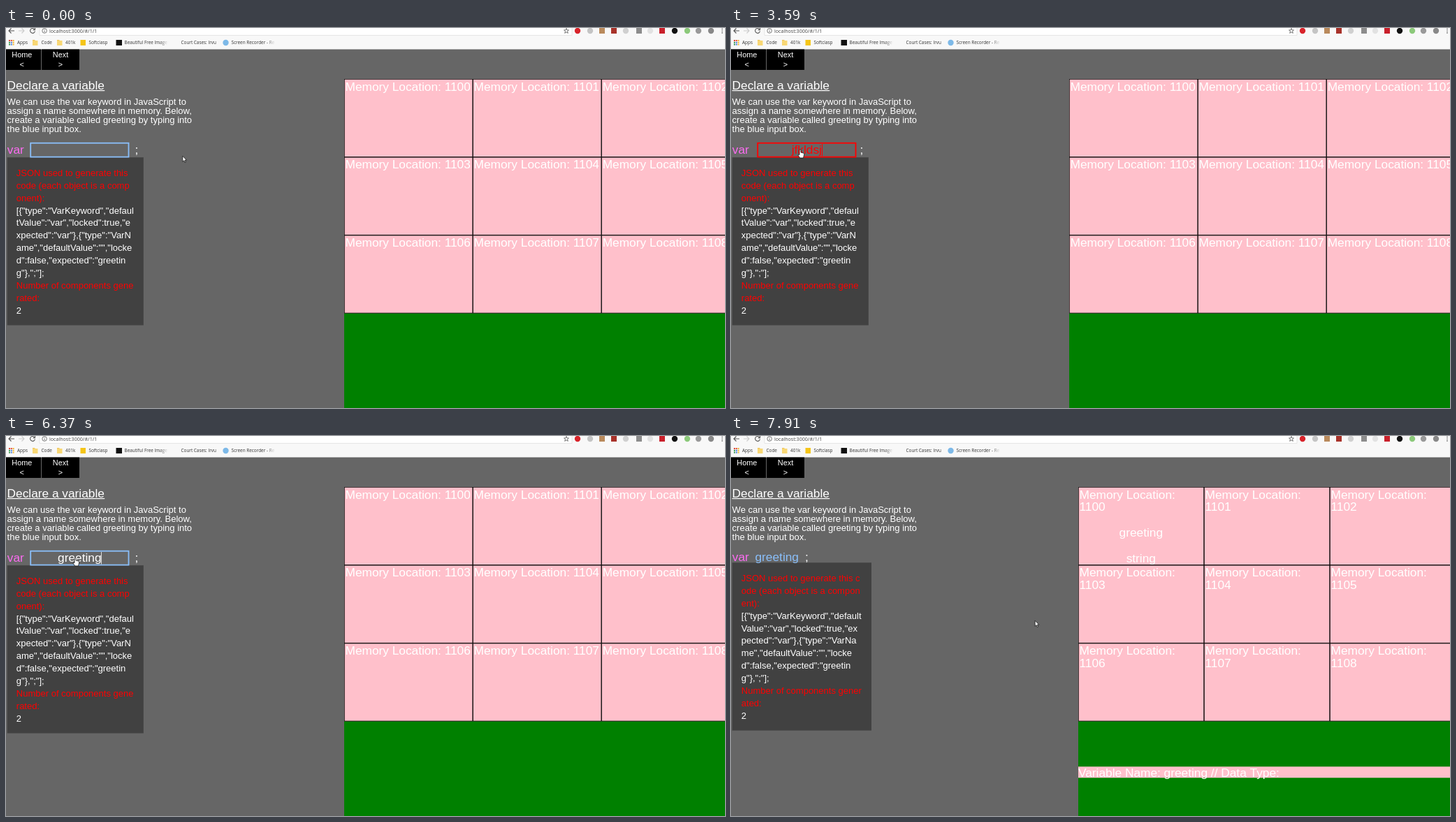
Write an HTML page with a canvas that moves like this. It is 1029 px wide and 544 px high and loops after 8000 ms.

```html
<!DOCTYPE html>
<html lang="en">
<head>
<meta charset="utf-8">
<title>Declare a variable</title>
<style>
  html, body { margin: 0; width: 100%; height: 100%; overflow: hidden; background: #666; }
  canvas { display: block; }
</style>
</head>
<body>
<canvas id="stage" width="1029" height="544"></canvas>
<script>
const ctx = document.getElementById('stage').getContext('2d');
const LOOP = 8000, SOLVED = 6850, BIG = 17.3, SMALL = 13;
const ARIAL = '"Liberation Sans", Arial, sans-serif';
const UI = '"Open Sans", "Noto Sans", sans-serif';
const BLUE = '#8abffa', PINK = '#ffc0cb', BAR = '#f8f8f8';

const PANEL_BEFORE = ['JSON used to generate this', 'code (each object is a comp', 'onent):',
  '[{"type":"VarKeyword","defaul', 'tValue":"var","locked":true,"e', 'xpected":"var"},{"type":"VarN',
  'ame","defaultValue":"","locke', 'd":false,"expected":"greetin', 'g"},";"];',
  'Number of components gene', 'rated:', '2'];
const PANEL_AFTER = ['JSON used to generate this c', 'ode (each object is a compon', 'ent):',
  '[{"type":"VarKeyword","default', 'Value":"var","locked":true,"ex', 'pected":"var"},{"type":"VarNa',
  'me","defaultValue":"","locke', 'd":false,"expected":"greetin', 'g"},";"];',
  'Number of components gener', 'ated:', '2'];

// [time, value]
const TYPED = [[0, ''], [2140, 'jf'], [2210, 'jfk'], [2280, 'jfkl'], [2350, 'jfkld'], [2420, 'jfkldsj'],
  [5220, ''], [5480, 'g'], [5660, 'gr'], [5780, 'gre'], [5890, 'gree'], [6070, 'greet'],
  [6210, 'greeti'], [6290, 'greetin'], [6370, 'greeting']];
const CARET = [[0, false], [650, true], [1170, false], [1690, true], [2950, false],
  [3450, true], [3980, false], [5220, true]];
// [time, x, y] of the pointer tip
const POINTER = [[0, 252.5, 183], [59, 252.5, 183], [60, 247, 180.5], [210, 247, 180.5], [300, 200, 178],
  [420, 140, 171], [520, 100, 167], [600, 91, 169], [740, 99, 173.5], [7849, 99, 173.5],
  [7850, 250, 215], [7909, 250, 215], [7910, 434.8, 264]];

const latest = (steps, t) => steps.filter(s => s[0] <= t).pop()[1];

function pointerAt(t) {
  const i = POINTER.findIndex(p => p[0] > t);
  if (i < 0) return POINTER[POINTER.length - 1].slice(1);
  const [a, b] = [POINTER[i - 1], POINTER[i]];
  const k = (t - a[0]) / (b[0] - a[0]);
  return [a[1] + (b[1] - a[1]) * k, a[2] + (b[2] - a[2]) * k];
}

// CSS "ease": cubic-bezier(.25, .1, .25, 1)
function ease(x) {
  if (x <= 0 || x >= 1) return x <= 0 ? 0 : 1;
  let lo = 0, hi = 1;
  for (let i = 0; i < 20; i++) {
    const s = (lo + hi) / 2;
    if (.75 * s * (1 - s) + s ** 3 < x) lo = s; else hi = s;
  }
  return .3 * lo * (1 - lo) ** 2 + 3 * lo * lo * (1 - lo) + lo ** 3;
}

function rect(x, y, w, h, color) {
  ctx.fillStyle = color;
  ctx.fillRect(x, y, w, h);
}

function text(str, x, y, size, color = '#fff', align = 'left', family = ARIAL) {
  ctx.font = `${size}px ${family}`;
  ctx.textAlign = align;
  ctx.fillStyle = color;
  ctx.fillText(str, x, y);
}

function widthOf(str, size) {
  ctx.font = `${size}px ${ARIAL}`;
  return ctx.measureText(str).width;
}

function disc(x, y, r, color) {
  ctx.fillStyle = color;
  ctx.beginPath();
  ctx.arc(x, y, r, 0, 7);
  ctx.fill();
}

function stroke(path, color, width = 1) {
  ctx.strokeStyle = color;
  ctx.lineWidth = width;
  ctx.stroke(new Path2D(path));
}

function shape(path, x, y) {
  ctx.save();
  ctx.translate(x, y);
  const p = new Path2D(path);
  ctx.fillStyle = '#fff';
  ctx.fill(p);
  ctx.strokeStyle = '#111';
  ctx.lineWidth = .8;
  ctx.stroke(p);
  ctx.restore();
}

function bookmark(label, x, fadeEnd) {
  text(label, x, 23.4, 6.4, '#333', 'left', UI);
  if (!fadeEnd) return;
  const fade = ctx.createLinearGradient(fadeEnd - 12, 0, fadeEnd, 0);
  fade.addColorStop(0, 'rgba(248,248,248,0)');
  fade.addColorStop(1, BAR);
  rect(fadeEnd - 12, 15, 40, 12, fade);
}

function browserBar() {
  rect(0, 0, 1029, 30.5, BAR);
  rect(48, 0, 762, 10.5, '#fff');
  stroke('M48 0V10.5H810V0', '#ddd', .7);
  stroke('M12 4H4M7.5 .5L4 4L7.5 7.5', '#555', 1.1);
  stroke('M18 4H26M22.5 .5L26 4L22.5 7.5', '#ccc', 1.1);
  stroke('M40.5 1.6A3.4 3.4 0 1 0 41.4 4.5M41.5 0V2.6H38.8', '#555', 1.1);
  stroke('M58.4 4A3.3 3.3 0 1 1 51.8 4A3.3 3.3 0 1 1 58.4 4M55.1 3.5V6M55.1 1.8V2.6', '#555', .8);
  text('localhost:3000/#/1/1', 62, 6.5, 7.1, '#444', 'left', UI);
  stroke('M802 .5L803 3H805.5L803.5 4.7L804.3 7.4L802 5.8L799.7 7.4L800.5 4.7L798.5 3H801Z', '#555', .8);

  [[818, '#d8232a'], [836, '#c4c4c4'], [887, '#d0d0d0'], [922, '#e2e2e2'], [957, '#111'],
    [975, '#8cc97a'], [991, '#999'], [1009, '#888']].forEach(([x, c]) => disc(x, 4, 4.2, c));
  [[853, '#b98a5c'], [870, '#a8322a'], [906, '#8c8c8c'], [939, '#c9202b']]
    .forEach(([x, c]) => rect(x - 4, 0, 8, 8, c));
  for (const y of [1.5, 4.2, 6.9]) disc(1025, y, .8, '#555');

  const dots = ['#e24a3b', '#e24a3b', '#f2b632', '#3f9b57', '#4c7fe0', '#f2b632', '#3f9b57', '#4c7fe0', '#f2b632'];
  dots.forEach((c, i) => rect(4 + i % 3 * 2.8, 17 + Math.floor(i / 3) * 2.8, 2, 2, c));
  for (const x of [38, 73]) {
    rect(x, 17, 3.5, 2, '#eec35a');
    rect(x, 18, 7.5, 7, '#f8d775');
  }
  rect(106.5, 17, 7.5, 8, '#f5c518');
  rect(157.5, 17, 8.5, 8, '#111');
  disc(242.5, 21, 4, '#2a92c4');
  disc(314.5, 21, 4.2, '#7db9e8');
  bookmark('Apps', 16, 0);
  bookmark('Code', 50.5, 0);
  bookmark('401k', 85, 0);
  bookmark('Softclasp', 118.5, 0);
  bookmark('Beautiful Free Images', 169.5, 232);
  bookmark('Court Cases: Irvu', 250.5, 0);
  bookmark('Screen Recorder - Rec', 322.5, 385);
}

function lesson() {
  [['Home', '<', 0, 50, 22.8], ['Next', '>', 51, 54, 78]].forEach(([label, sign, x, w, mid]) => {
    rect(x, 30.5, w, 29.5, '#000');
    text(label, mid, 41.8, 10.9, '#fff', 'center');
    text(sign, mid, 56, 10.9, '#fff', 'center');
  });
  text('Declare a variable', 1.6, 87.8, BIG);
  rect(1.6, 89, 139.6, 1.2, '#fff');
  ['We can use the var keyword in JavaScript to', 'assign a name somewhere in memory. Below,',
    'create a variable called greeting by typing into', 'the blue input box.']
    .forEach((line, i) => text(line, 1.6, 109.6 + i * 13, SMALL));
}

function panel(lines, width, top) {
  rect(1.6, top, width, 240.3, '#414141');
  lines.forEach((line, i) => {
    const red = i < 3 || i === 9 || i === 10;
    text(line, 14.8, top + 26.8 + i * 17.87, SMALL, red ? '#f00' : '#fff');
  });
}

function memory(left, cellWidth, wrap) {
  const cellHeight = 111.8;
  rect(left, 408.5, 1029 - left, 136, '#008000');
  for (let i = 0; i < 9; i++) {
    const x = left + i % 3 * cellWidth, y = 73 + Math.floor(i / 3) * cellHeight;
    rect(x, y, cellWidth, cellHeight, '#000');
    rect(x + .7, y + .7, cellWidth - 1.4, cellHeight - 1.4, PINK);
    const label = 'Memory Location:', id = 1100 + i;
    text(wrap ? label : `${label} ${id}`, x + 1.5, y + 16.6, BIG);
    if (wrap) text(id, x + 1.5, y + 33.9, BIG);
  }
}

function inputBox(t) {
  const wrong = t >= 2980 && t < 4530;
  const s = (t - 2980) / 1000;
  const shift = wrong ? 14.3 * Math.exp(-2.5 * s) * Math.sin(12.4 * s) : 0;
  const value = latest(TYPED, t);
  const width = widthOf(value, BIG), middle = 105.3 + shift, left = middle - width / 2;

  ctx.strokeStyle = wrong ? '#f00' : BLUE;
  ctx.lineWidth = 1.8;
  ctx.strokeRect(35.2 + shift, 164.7, 140.3, 19.9);

  // Letters are selected one by one from the end.
  if (t >= 4670 && t < 5220) {
    const count = Math.min(7, Math.floor((t - 4670) / 46.6) + 1);
    const start = left + widthOf(value.slice(0, 7 - count), BIG);
    rect(start, 167.5, left + width - start, 16, '#1272dc');
  }
  text(value, left, 180, BIG, wrong ? '#f00' : '#fff');
  if (latest(CARET, t)) rect(Math.round(left + width - .3), 166, 1, 17.5, wrong ? '#f00' : '#ddd');
}

function variableBar(t) {
  const opacity = ease((t - 7030) / 750);
  ctx.globalAlpha = opacity;
  text('greeting', 586.8, 143.6, BIG, '#fff', 'center');
  text('string', 586.8, 180.6, BIG, '#fff', 'center');
  ctx.globalAlpha = 1;
  if (t < 7030) return;

  // Critically damped slide from the left.
  const k = 13 * (t - SOLVED) / 1000;
  const x = 497 - 450 * Math.exp(-k) * (1 + k);
  ctx.save();
  ctx.beginPath();
  ctx.rect(497, 409, 532, 135);
  ctx.clip();
  rect(x, 473.3, 540, 16, PINK);
  text('Variable Name: greeting // Data Type:', x, 488, BIG);
  ctx.restore();
}

function pointer(t) {
  const [x, y] = pointerAt(t);
  const arrow = 'M.3 .3V8.4L2.2 6.7L3.5 9.6L4.8 9L3.5 6.2H6Z';
  const hand = 'M-1 1Q0-.4 1 1V4.6L5 5.6Q6 6 5.7 7.6L4.6 12.5H-.4L-3 8.6Q-3 7-1 8Z';
  shape(x < 177 ? hand : arrow, x, y);
}

function draw(t) {
  const solved = t >= SOLVED;
  rect(0, 0, 1029, 544, '#666');
  browserBar();
  lesson();
  const baseline = solved ? 178.5 : 180;
  text('var', 1.8, baseline, BIG, '#fb6cf0');
  text(';', solved ? 106 : 184.6, baseline, BIG);
  if (solved) {
    panel(PANEL_AFTER, 199.4, 181.3);
    text('greeting', 34.5, baseline, BIG, BLUE);
    memory(497, 180, true);
    variableBar(t);
  } else {
    panel(PANEL_BEFORE, 195.2, 185.2);
    inputBox(t);
    memory(484, 184.1, false);
  }
  pointer(t);
}

const begin = performance.now();
function tick() {
  draw((performance.now() - begin) % LOOP);
  requestAnimationFrame(tick);
}
tick();
</script>
</body>
</html>
```
